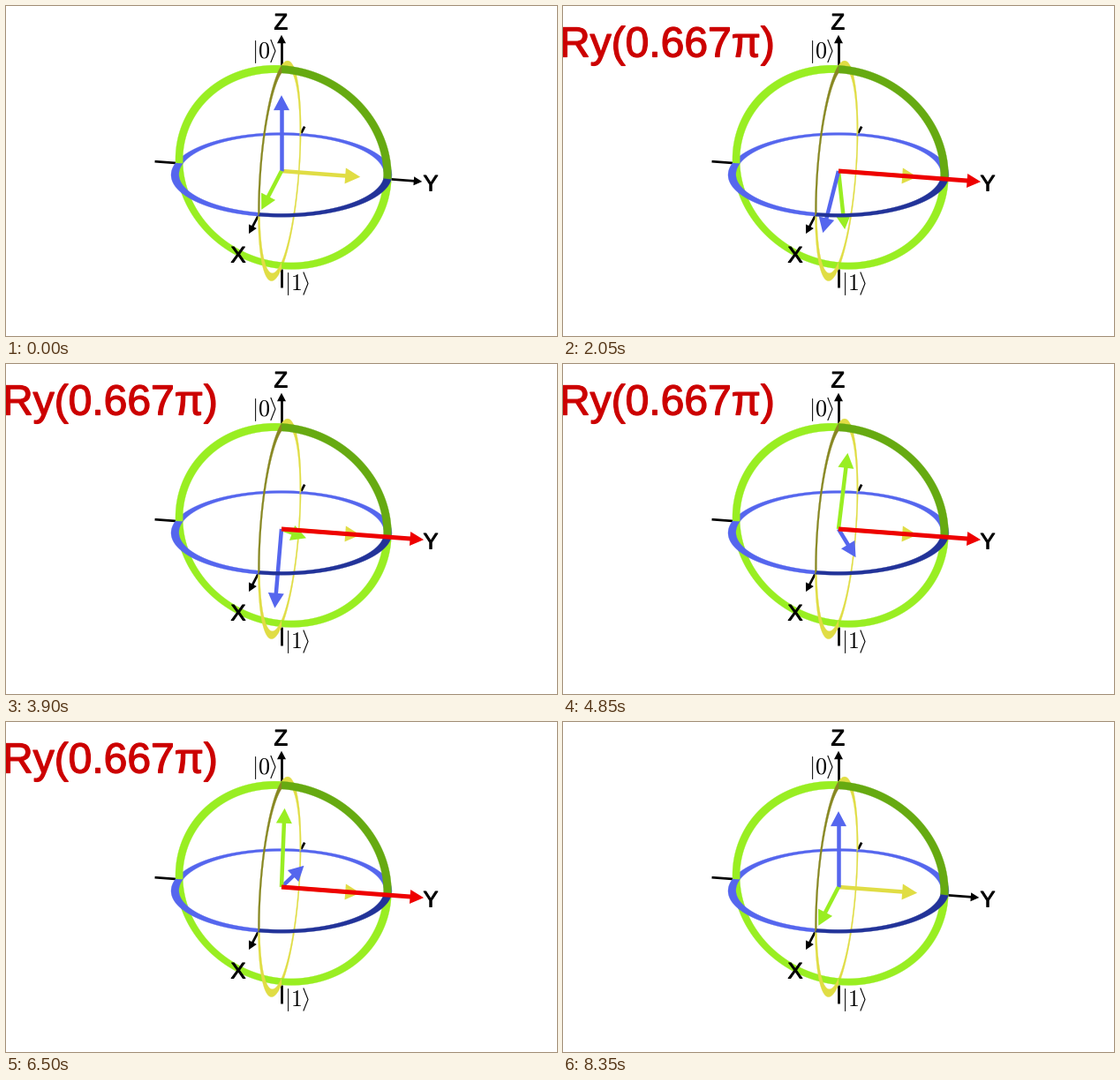
A matplotlib script that plays this animation: 624 px wide and 374 px high, repeating every 9400 ms.

```python
import numpy as np
import matplotlib.pyplot as plt
from matplotlib.animation import FuncAnimation
from matplotlib.patches import Polygon
from matplotlib.patheffects import Stroke

W, H, DPI = 624, 374, 100
PX = 72 / DPI                      # points per pixel
CENTER = np.array([312, 187])
SCALE, K = 124.5, 0.1              # sphere radius in px, perspective strength
ELEV, AZIM = np.radians([22.4, 11.2])

FADE, TURN = 8, 40                 # frames per fade and per rotation
STEP = 2 * FADE + TURN
FRAMES, INTERVAL = 188, 50
ANGLE = 2 * np.pi / 3

BLUE, DARK_BLUE = "#5566ee", "#223399"
GREEN, DARK_GREEN = "#99ee22", "#66aa11"
YELLOW, OLIVE = "#e0dd44", "#888822"
RED, TEXT_RED = "#ee0000", "#cc0000"

ce, se, ca, sa = np.cos(ELEV), np.sin(ELEV), np.cos(AZIM), np.sin(AZIM)
RIGHT = np.array([-sa, ca, 0])
DOWN = np.array([ca * se, sa * se, -ce])
TOWARD = np.array([ca * ce, sa * ce, se])
X, Y, Z = np.eye(3)


def project(p):
    p = np.asarray(p, float)
    flat = np.stack([p @ RIGHT, p @ DOWN], axis=-1)
    return CENTER + SCALE * flat / (1 - K * (p @ TOWARD))[..., None]


fig = plt.figure(figsize=(W / DPI, H / DPI), dpi=DPI, facecolor="white")
ax = fig.add_axes([0, 0, 1, 1])
ax.set_xlim(0, W)
ax.set_ylim(H, 0)
ax.axis("off")


def add_ring(a, b, color, dark, inner=0.93):
    """Flat annulus in the plane of a and b, one piece per quadrant."""
    for q in range(4):
        t = np.linspace(q, q + 1, 50)[:, None] * np.pi / 2
        arc = np.cos(t) * a + np.sin(t) * b
        shape = project(np.vstack([arc, inner * arc[::-1]]))
        fill = color if q else dark
        ax.add_patch(Polygon(shape, fc=fill, ec=fill, lw=0.2,
                             zorder=10 + arc[25] @ TOWARD))


def segment(p, q, color, width, z):
    return ax.plot(*np.array([p, q]).T, color=color, lw=width * PX,
                   solid_capstyle="butt", zorder=z)[0]


class Arrow:
    """Projected shaft with a head of constant size on screen."""

    def __init__(self, color, width, length, half, z):
        self.length, self.half = length, half
        self.shaft = segment(CENTER, CENTER, color, width, z)
        self.head = ax.add_patch(Polygon(np.zeros((3, 2)), fc=color,
                                         lw=0, zorder=z))

    def place(self, start, end):
        p, q = project(start), project(end)
        d = (q - p) / np.hypot(*(q - p))
        n = self.half * np.array([-d[1], d[0]])
        self.shaft.set_data(*np.array([p, q + d]).T)
        self.head.set_xy([q + n, q + self.length * d, q - n])

    def set_zorder(self, z):
        self.shaft.set_zorder(z)
        self.head.set_zorder(z)

    def set_alpha(self, a):
        self.shaft.set_alpha(a)
        self.head.set_alpha(a)


def label(x, y, s, size, color="black", **kw):
    return ax.text(x, y, s, fontsize=size * PX, color=color, ha="left",
                   va="baseline", zorder=30, **kw)


def sans(x, y, s, size, color="black", weight=1):
    """Sans label with slightly heavier strokes."""
    effect = Stroke(linewidth=weight * PX, foreground=color)
    return label(x, y, s, size, color, family="Liberation Sans",
                 path_effects=[effect])


def ket(x, y, digit):
    label(x, y, f"$|{digit}$", 26, math_fontfamily="cm")
    ax.plot(x + np.array([22, 27, 22]), y + np.array([-20, -7.5, 5]),
            color="black", lw=1.1 * PX, zorder=30)


add_ring(X, Y, BLUE, DARK_BLUE)
add_ring(Y, Z, GREEN, DARK_GREEN)
add_ring(Z, X, YELLOW, OLIVE)

for axis in (X, Y, Z):
    Arrow("black", 2.7, 9.5, 5, 9.5).place(axis, 1.2 * axis)
    segment(project(-axis), project(-1.2 * axis), "black", 2.7, 8)

sans(303.5, 26.5, "Z", 25.5)
sans(472.5, 209.5, "Y", 25.5)
sans(254.5, 290.5, "X", 25.5)
ket(278, 58.5, 0)
ket(315, 322, 1)
title = sans(-4, 57.5, "Ry(0.667π)", 48, TEXT_RED, 1.3)

vectors = [(Arrow(c, 4.5, 17, 9, 10), v)
           for c, v in ((YELLOW, Y), (GREEN, X), (BLUE, Z))]
spin = Arrow(RED, 5, 15.5, 8, 20)
spin.place(0 * Y, 1.167 * Y)


def ease(n, count):
    u = np.clip(n / (count - 1), 0, 1)
    return (1 - np.cos(np.pi * u)) / 2


def update(i):
    turn, n = divmod(min(i, 3 * STEP - 1), STEP)
    theta = ANGLE * (turn + ease(n - FADE, TURN))
    alpha = ease(n, FADE) * (1 - ease(n - FADE - TURN, FADE))
    c, s = np.cos(theta), np.sin(theta)
    rot = np.array([[c, 0, s], [0, 1, 0], [-s, 0, c]])
    for arrow, v in vectors:
        end = 0.585 * rot @ v
        arrow.place(0 * v, end)
        arrow.set_zorder(10 + 0.05 * end @ TOWARD)
    spin.set_alpha(alpha)
    title.set_alpha(alpha)
    return []


anim = FuncAnimation(fig, update, frames=FRAMES, interval=INTERVAL,
                     init_func=lambda: update(0), repeat=True, repeat_delay=0)
plt.show()
```
